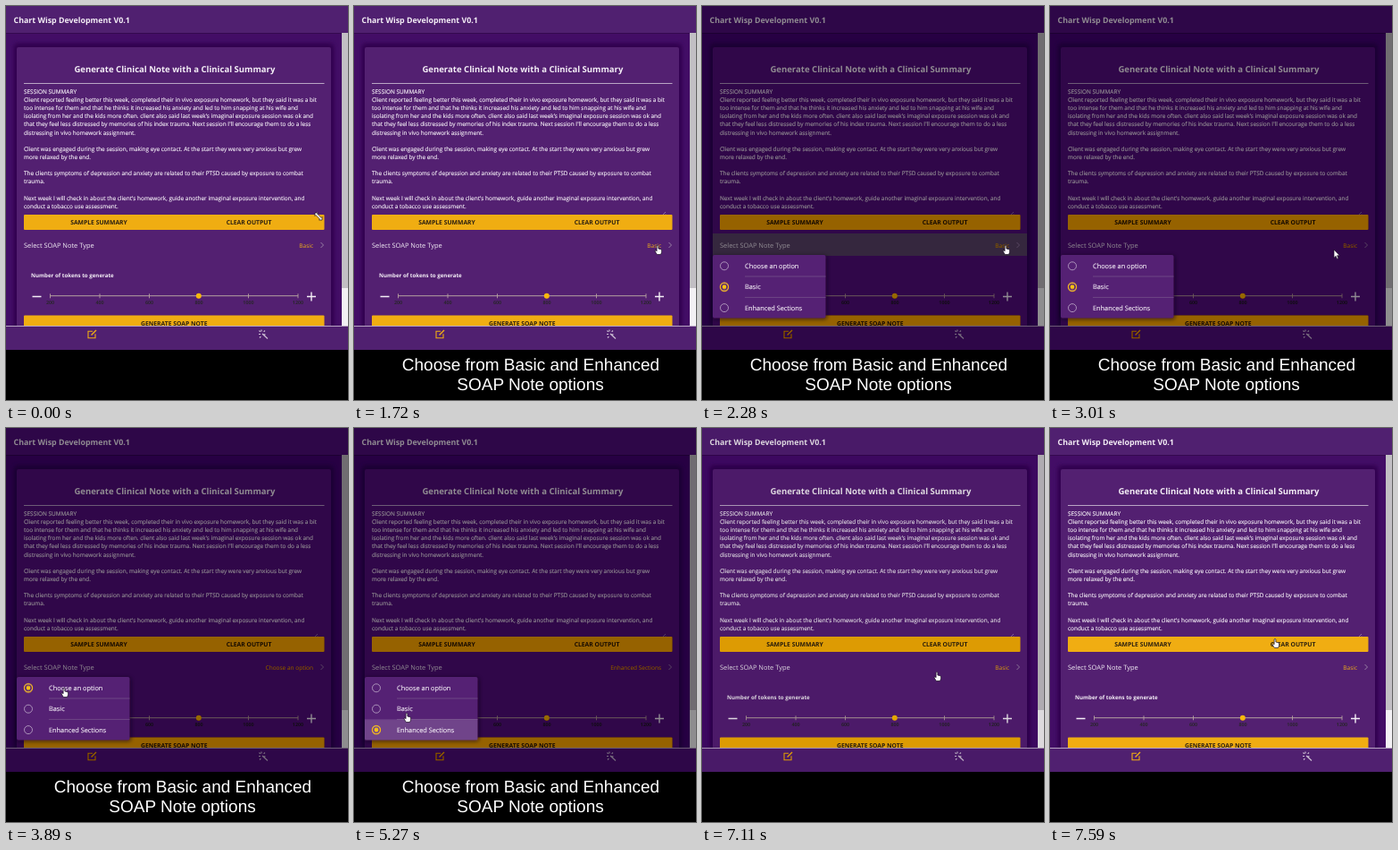
Write an HTML page that moves like this. It is 383 px wide and 440 px high and loops after 8 s.

```html
<!DOCTYPE html>
<html lang="en">
<head>
<meta charset="utf-8">
<title>Clinical note options</title>
<style>
  html, body { margin: 0; width: 100%; height: 100%; overflow: hidden; background: #000; }
  svg { display: block; width: 383px; height: 440px; }
  text { font-family: "Open Sans", "Noto Sans", sans-serif; fill: #f4eef6; text-rendering: geometricPrecision; }
  .bold { font-weight: 700; }
  .mid { text-anchor: middle; }
  .button { font-size: 6.8px; font-weight: 700; text-anchor: middle; fill: #2c2010; }
  .value { font-size: 6.5px; text-anchor: end; fill: #efae18; }
  .tick { font-size: 5.4px; font-weight: 700; text-anchor: middle; fill: #2c2630; }
  .option { font-size: 7.35px; }
  .option, #summary text { stroke: #f4eef6; stroke-width: .14px; }
  .caption { font: 19px "Liberation Sans", Arial, sans-serif; text-anchor: middle; fill: #fff; }

  /* One percent of the loop is 80 ms. */
  .play { animation: 8s linear infinite; }
  .hard { animation: 8s step-end infinite; }
  #captions { animation-name: captions; }
  #screen { animation-name: dim; }
  #popup { animation-name: popup; transform-origin: 12px 278px; }
  #ripple { animation-name: ripple; }
  #choice { animation-name: choice; }
  #press { animation-name: press; }
  #basic { animation-name: basic; }
  #none { animation-name: none-label; }
  #enhanced { animation-name: enhanced; }
  #cursor { animation-name: travel; animation-timing-function: ease-in-out; }
  #hand { animation-name: hand; }
  #arrow { animation-name: arrow; }
  #resize { animation-name: resize; }

  @keyframes captions { 0%, 9% { opacity: 0 } 15.25%, 80.2% { opacity: 1 } 88%, 100% { opacity: 0 } }
  @keyframes dim {
    0%, 23.5% { filter: saturate(1) brightness(1) contrast(1) }
    28%, 85.5% { filter: saturate(1.3) brightness(.58) contrast(1.08) }
    90%, 100% { filter: saturate(1) brightness(1) contrast(1) }
  }
  @keyframes popup {
    0%, 23.5% { opacity: 0; transform: scale(.85) }
    27%, 85.5% { opacity: 1; transform: none }
    88.5%, 100% { opacity: 0; transform: none }
  }
  @keyframes ripple { 0%, 22.5% { opacity: 0 } 24.5%, 28.5% { opacity: 1 } 31.5%, 100% { opacity: 0 } }
  @keyframes choice {
    0% { transform: translateY(313.7px) }
    44.5% { transform: translateY(290.3px) }
    64.5% { transform: translateY(337.1px) }
    70.9%, 100% { transform: translateY(313.7px) }
  }
  @keyframes press {
    0%, 44.5% { opacity: 0 } 45.3%, 46.3% { opacity: 1 } 48.5%, 64.5% { opacity: 0 }
    65.3%, 66.5% { opacity: 1 } 68.7%, 70.9% { opacity: 0 }
    71.7%, 72.7% { opacity: 1 } 75%, 100% { opacity: 0 }
  }
  @keyframes basic { 0% { opacity: 1 } 44.5% { opacity: 0 } 70.9%, 100% { opacity: 1 } }
  @keyframes none-label { 0% { opacity: 0 } 44.5% { opacity: 1 } 64.5%, 100% { opacity: 0 } }
  @keyframes enhanced { 0% { opacity: 0 } 64.5% { opacity: 1 } 70.9%, 100% { opacity: 0 } }
  @keyframes travel {
    0%, 2% { transform: translate(346px, 231px) }
    3%, 9.25% { transform: translate(346px, 240px) }
    15.25%, 32.5% { transform: translate(340px, 267px) }
    34.5%, 37.6% { transform: translate(318px, 272px) }
    43.5%, 57.9% { transform: translate(65px, 290px) }
    62%, 64.5% { transform: translate(62px, 335px) }
    65.8% { transform: translate(59px, 318px) }
    68.5%, 71% { transform: translate(57px, 313px) }
    78%, 90% { transform: translate(263px, 272px) }
    94.8%, 100% { transform: translate(252px, 235px) }
  }
  @keyframes hand {
    0% { opacity: 0 } 2% { opacity: 1 } 32.5% { opacity: 0 } 42% { opacity: 1 }
    74% { opacity: 0 } 88% { opacity: 1 } 100% { opacity: 1 }
  }
  @keyframes arrow {
    0% { opacity: 0 } 32.5% { opacity: 1 } 42% { opacity: 0 }
    74% { opacity: 1 } 88%, 100% { opacity: 0 }
  }
  @keyframes resize { 0% { opacity: 1 } 2%, 100% { opacity: 0 } }
</style>
</head>
<body>
<svg viewBox="0 0 383 440">
  <defs>
    <filter id="soft" x="-20%" y="-20%" width="140%" height="140%"><feGaussianBlur stdDeviation="2"/></filter>
    <clipPath id="view"><rect y="30" width="383" height="327"/></clipPath>
  </defs>
  <rect width="383" height="440"/>

  <g id="screen" class="play">
    <g clip-path="url(#view)">
      <rect y="30" width="376" height="327" fill="#430d66"/>
      <rect x="8.5" y="41.5" width="359" height="330" rx="5" fill="#310650" filter="url(#soft)"/>
      <rect x="12" y="46" width="352" height="320" rx="2" fill="#532071"/>
      <rect x="376" y="30" width="7" height="327" fill="#f3f1f4"/>
      <rect x="376" y="30" width="7" height="285" fill="#c2bfc4"/>

      <text class="bold mid" x="188.9" y="73.5" font-size="9.56">Generate Clinical Note with a Clinical Summary</text>
      <path d="M20 86.5H356.5" stroke="#b9a5c4"/>
      <g id="summary" font-size="6.45"></g>
      <path d="M345 234l4-4M347.5 234l1.5-1.5" stroke="#a997b3" stroke-width=".7"/>

      <rect x="20" y="233" width="336.5" height="17" rx="1" fill="#f0ad12"/>
      <text class="button" x="104" y="244.3">SAMPLE SUMMARY</text>
      <text class="button" x="272" y="244.3">CLEAR OUTPUT</text>

      <rect id="ripple" class="play" x="12" y="254" width="352" height="25" fill="#6b6b6b" fill-opacity=".65"/>
      <text x="20" y="269.8" font-size="7.46">Select SOAP Note Type</text>
      <text id="basic" class="value hard" x="344" y="269.5">Basic</text>
      <text id="none" class="value hard" x="344" y="269.5">Choose an option</text>
      <text id="enhanced" class="value hard" x="344" y="269.5">Enhanced Sections</text>
      <path d="M352.5 264l3 3-3 3" fill="none" stroke="#a08cab" stroke-width=".9"/>

      <text class="bold" x="28" y="303" font-size="6.15">Number of tokens to generate</text>
      <path d="M29.5 324.5h10M337 324.5h10M342 319.5v10" stroke="#f4eef6" stroke-width="1.4"/>
      <path d="M49.5 323.7H327" stroke="#b5a0a0"/>
      <g id="ticks"></g>
      <circle cx="215.8" cy="323.7" r="3" fill="#f8b80c"/>

      <rect x="20" y="345.5" width="336.5" height="17" rx="1" fill="#f0ad12"/>
      <text class="button" x="188.3" y="356.8">GENERATE SOAP NOTE</text>
    </g>

    <rect width="383" height="30" fill="#502070"/>
    <path d="M0 30.5H376" stroke="#35094f"/>
    <text class="bold" x="8.5" y="18.8" font-size="8.86">Chart Wisp Development V0.1</text>
    <rect y="357" width="383" height="27" fill="#502070"/>
    <path d="M0 357.5H383" stroke="#b8a5c3"/>
    <g fill="none" stroke="#f0ad12" stroke-width="1.1">
      <path d="M97 363.2h-5v7.6h8v-4.5"/>
      <path d="M95.5 367.5l5.5-5.5" stroke-width="1.5"/>
    </g>
    <path d="M287 366l6 5.5M286 361.5v2M283 366.5h2M283.5 362.5l1.4 1.4M290 362.5l-1.4 1.4M284 370.5l1.4-1.4M288 366.8h2.5" fill="none" stroke="#cdbfd4" stroke-width="1.2"/>
  </g>

  <g id="popup" class="play">
    <rect x="12" y="279" width="128" height="71" rx="3" fill="#160022" fill-opacity=".6" filter="url(#soft)"/>
    <rect x="12" y="278" width="126.5" height="70.5" rx="2" fill="#552174"/>
    <path d="M48 302h90.5M48 325.4h90.5" stroke="#74508a" stroke-width=".8"/>
    <g id="choice" class="hard">
      <rect id="press" class="play" x="12" y="-11.7" width="126.5" height="23.2" fill="#fff" fill-opacity=".16"/>
      <circle cx="25" r="2.4" fill="#f8c212"/>
      <circle cx="25" r="4.6" fill="none" stroke="#f5b60f" stroke-width="1.2"/>
    </g>
    <g id="options"></g>
  </g>

  <g id="captions" class="play">
    <text class="caption" x="198" y="407">Choose from Basic and Enhanced</text>
    <text class="caption" x="197.5" y="429">SOAP Note options</text>
  </g>

  <g id="cursor" class="play" stroke="#180c20" stroke-width=".7" stroke-linejoin="round">
    <path id="hand" class="hard" fill="#fff" d="M-.9 1Q0-.6 .9 1V4L4.6 5V8L3.5 10.5H-.6L-3 6.8Q-2.8 5.6-1.8 6L-.9 6.8Z"/>
    <path id="arrow" class="hard" fill="#fff" d="M0 0V9.2L2.1 7.3L3.5 10.4L5 9.7L3.6 6.7H6.4Z"/>
    <path id="resize" class="hard" fill="#fff" d="M0 0H3.5L2.5 1L7 5.5L8 4.5V8H4.5L5.5 7L1 2.5L0 3.5Z"/>
  </g>
</svg>
<script>
  const summary = `SESSION SUMMARY
Client reported feeling better this week, completed their in vivo exposure homework, but they said it was a bit
too intense for them and that he thinks it increased his anxiety and led to him snapping at his wife and
isolating from her and the kids more often. client also said last week's imaginal exposure session was ok and
that they feel less distressed by memories of his index trauma. Next session I'll encourage them to do a less
distressing in vivo homework assignment.

Client was engaged during the session, making eye contact. At the start they were very anxious but grew
more relaxed by the end.

The clients symptoms of depression and anxiety are related to their PTSD caused by exposure to combat
trauma.

Next week I will check in about the client's homework, guide another imaginal exposure intervention, and
conduct a tobacco use assessment.`;

  function add(parent, tag, attrs, text = "") {
    const node = document.createElementNS("http://www.w3.org/2000/svg", tag);
    for (const key in attrs) node.setAttribute(key, attrs[key]);
    node.textContent = text;
    const group = document.getElementById(parent);
    group.append(node);
  }

  summary.split("\n").forEach((line, i) => {
    add("summary", "text", { x: 20, y: 97.8 + 9.14 * i }, line);
  });

  for (let i = 0; i < 6; i++) {
    const x = 49.5 + 55.5 * i;
    add("ticks", "path", { d: `M${x} 321.3v5`, stroke: "#b5a0a0", "stroke-width": .9 });
    add("ticks", "text", { class: "tick", x, y: 333.3 }, String(200 * (i + 1)));
  }

  // The selected ring is the same size, so the plain rings sit behind it.
  ["Choose an option", "Basic", "Enhanced Sections"].forEach((label, i) => {
    const y = 290.3 + 23.4 * i;
    add("options", "text", { class: "option", x: 48, y: y + 2.7 }, label);
    add("options", "circle", { cx: 25, cy: y, r: 4.5, fill: "none", stroke: "#b49cc0", "stroke-width": .9 });
  });
  const choice = document.getElementById("choice");
  choice.before(...document.querySelectorAll("#options circle"));
</script>
</body>
</html>
```
